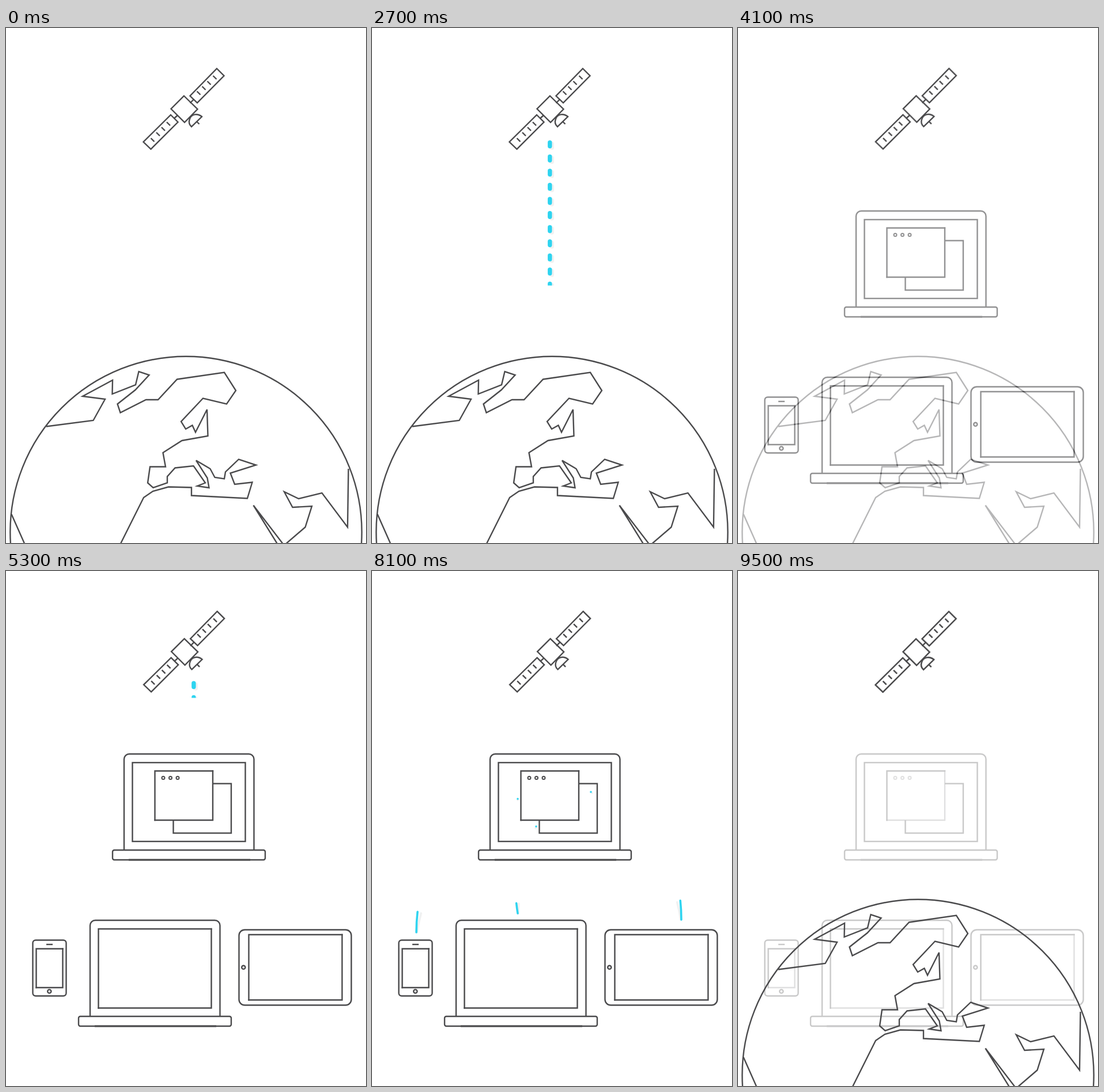
Animation, 625 px wide and 895 px high, one loop 9.6 s. Source, as an HTML page:

```html
<!DOCTYPE html>
<html lang="en">
<head>
<meta charset="utf-8">
<title>Satellite to devices</title>
<style>
  html, body { margin: 0; width: 100%; height: 100%; overflow: hidden; background: #fff; }
  svg { display: block; width: 100vw; height: 100vh; }
  .ink { fill: none; stroke: #4a4a4c; stroke-width: 2.4; }
  .round { stroke-linecap: round; }
  .edge { stroke-linecap: square; }
  .dash { fill: none; stroke-width: 7.4; stroke-linecap: round; stroke-dasharray: 6.5 18.05; }
  .arc { fill: none; stroke-width: 3.6; stroke-linecap: round; }
  .blue { stroke: #2ed4f0; }
  .shade { stroke: #f1f1f1; }
</style>
</head>
<body>
<svg viewBox="0 0 625 895" preserveAspectRatio="none">
  <defs>
    <clipPath id="upClip"><rect id="upRect" x="295" width="40"/></clipPath>
    <clipPath id="downClip"><rect id="downRect" x="312" width="40"/></clipPath>

    <g id="satellite" class="ink">
      <path d="M366 70.5 378.5 83 332 130 319.5 118Z M286 151 298.5 163.5 251.5 210.5 238.5 198Z"/>
      <path d="M309 118 332.5 141 310 164 286.5 140.5Z"/>
      <path d="M319.5 130.5 325.5 124.5 M291.5 157.5 298 151.5"/>
      <path d="M359.5 83l6 6m-16 3.500l6 6m-15 3l6 6m-15 2.500l6 6"/>
      <path d="M251.500 191.500l6 6m3.500 -16l6 6m3 -15l6 6m3 -15l6 6"/>
      <path d="M340 154C333 148 322 149 319 158C317 163 318 168 322 171.500ZM331 162.500 335.500 167"/>
    </g>

    <g id="laptop">
      <path d="M205 485V327a9 9 0 0 1 9-9H421.500a9 9 0 0 1 9 9V485"/>
      <rect x="185" y="485" width="265" height="17" rx="3"/>
      <path d="M213 502H424" stroke-width="2.800"/>
    </g>
  </defs>

  <g id="planet">
    <g class="ink">
      <circle cx="312.500" cy="876" r="305.200"/>
      <path d="M70 692.500 151.500 682 172 645 133 640 185 612 184.500 636 225 620 230.500 597 248.500 603
        224.500 629 193.500 653.500 198.500 668.500 243 646 264 646 297 610.500 379 598.500 399 630 383 653.500
        342 643.500 304 684 312 697 323.500 690.500 329 702.500 349 663 350.500 709 305.500 717 272.500 738
        277 762.500 250 762.500 246 790.500 255.500 799 280 790.500 280 779.500 293.500 764.500 325.500 761
        346 790.500 332 796 352.500 799 349.500 782 330 751.500 354.500 766 362.500 781 379 783.500 381 771.500
        404 749.500 434 759.500 389.500 773.500 397 793 427.500 789.500 419 817.500 322 812.500 322 798.500
        282 797.500 255 805 239 816 198 898"/>
      <path d="M472 898 429.500 829.500 482 898M484 898 519.500 867.500 531 831 497.500 833 483 806 508 818
        548.500 808 593 867.500 594.500 766M9.500 845 33 898"/>
    </g>
    <use href="#satellite"/>
  </g>

  <g id="devices">
    <rect id="paper" width="625" height="895" fill="#fff"/>
    <use href="#satellite" x=".6" y="-.4"/>
    <g class="ink">
      <use href="#laptop"/>
      <rect x="219.500" y="333" width="196" height="137"/>
      <rect x="290.500" y="369.500" width="100.500" height="86"/>
      <rect x="258.500" y="347.500" width="100.500" height="85.500" fill="#fff" stroke="none"/>
      <use href="#laptop" x="-59" y="289"/>
      <rect x="46.500" y="641.500" width="58" height="97" rx="5"/>
      <path d="M70 649H81"/>
      <circle cx="75.300" cy="730.500" r="3.100"/>
      <rect x="404.500" y="623.500" width="195" height="131" rx="10"/>
      <circle cx="412.300" cy="688.800" r="3.100"/>
    </g>
    <g class="ink edge" id="firm"></g>
    <g class="ink edge" id="soft">
      <circle cx="273" cy="359.500" r="2.500" stroke-width="2"/>
      <circle cx="285.500" cy="359.500" r="2.500" stroke-width="2"/>
      <circle cx="298" cy="359.500" r="2.500" stroke-width="2"/>
    </g>
  </g>

  <g id="up" clip-path="url(#upClip)">
    <path class="dash shade" d="M312.300 201.500V552"/>
    <path class="dash blue" d="M308.800 199V549.500"/>
  </g>
  <g id="down" clip-path="url(#downClip)">
    <path class="dash shade" d="M329.300 197.500V302"/>
    <path class="dash blue" d="M325.900 195V300"/>
  </g>
  <g id="arcs">
    <path class="arc shade" d="M253 398C180 415 100 500 78 628"/>
    <path class="arc shade" d="M284 447C268 490 256 530 254 595"/>
    <path class="arc shade" d="M382 386C440 405 520 500 536 606"/>
    <path class="arc blue" d="M253 396C156 396 77 500 77 628"/>
    <path class="arc blue" d="M285 444C258 478 242 530 253 595"/>
    <path class="arc blue" d="M380 384C467 384 537 483 537 606"/>
  </g>
</svg>
<script>
  const LOOP = 9600, TICK = 100;
  const $ = id => document.getElementById(id);
  const clamp = v => Math.max(0, Math.min(1, v));
  const ramp = (t, from, to) => clamp((t - from) / (to - from));
  const set = (el, name, value) => el.setAttribute(name, value);
  const show = (el, on) => set(el, 'visibility', on ? 'visible' : 'hidden');

  // Inner frames whose right and bottom edges fade out sooner: left, top, right, bottom
  const frames = [
    [258.5, 347.5, 359, 433],
    [160.5, 622, 356.5, 759.5],
    [52.5, 656.5, 98.5, 724],
    [421.5, 632, 583.5, 745.5]
  ];
  function addPath(parent, d) {
    const p = document.createElementNS('http://www.w3.org/2000/svg', 'path');
    set(p, 'd', d);
    parent.appendChild(p);
  }
  for (const [l, t, r, b] of frames) {
    addPath($('firm'), `M${l} ${b}V${t}H${r}`);
    addPath($('soft'), `M${r} ${t}V${b}H${l}`);
  }

  const arcs = [...document.querySelectorAll('.arc')].map(el => ({ el, len: el.getTotalLength() }));

  function band(rect, top, bottom) {
    set(rect, 'y', top);
    set(rect, 'height', Math.max(0, bottom - top));
  }

  function trim({ el, len }, from, to) {
    set(el, 'stroke-dasharray', `0 ${len * from} ${len * (to - from)} ${len * 2}`);
  }

  function drawScenes(t) {
    const leaving = t >= 9200;
    const fadeIn = ramp(t, 3800, 4300);
    const planet = leaving ? 0.3 + 0.7 * ramp(t, 9200, 9500) : 1;
    const devices = leaving ? 1 - 0.7 * ramp(t, 9200, 9500) : fadeIn;
    show($('paper'), !leaving);
    set($('planet'), 'opacity', planet);
    set($('devices'), 'opacity', devices);
    set($('soft'), 'opacity', leaving ? 0.58 : 1);
  }

  function drawSignals(t) {
    show($('up'), t >= 1000 && t < 3400);
    const wipe = ramp(t, 2400, 3400);
    band($('upRect'), 553 - 360 * ramp(t, 900, 2400), wipe ? 554.8 - 357.5 * wipe : 562);

    show($('down'), t >= 5300 && t < 7100);
    const grow = ramp(t, 5200, 5600);
    band($('downRect'), 191 + 114 * ramp(t, 6700, 7100), grow < 1 ? 191 + 118 * grow : 312);

    show($('arcs'), t >= 5900 && t < 8200);
    const head = ramp(t, 5800, 6800), tail = ramp(t, 7300, 8200);
    for (const arc of arcs) trim(arc, tail, head);
  }

  function draw(now) {
    const t = Math.floor((now % LOOP) / TICK) * TICK;
    drawScenes(t);
    drawSignals(t);
  }

  const start = performance.now();
  function loop() {
    draw(performance.now() - start);
    requestAnimationFrame(loop);
  }
  loop();
</script>
</body>
</html>
```
